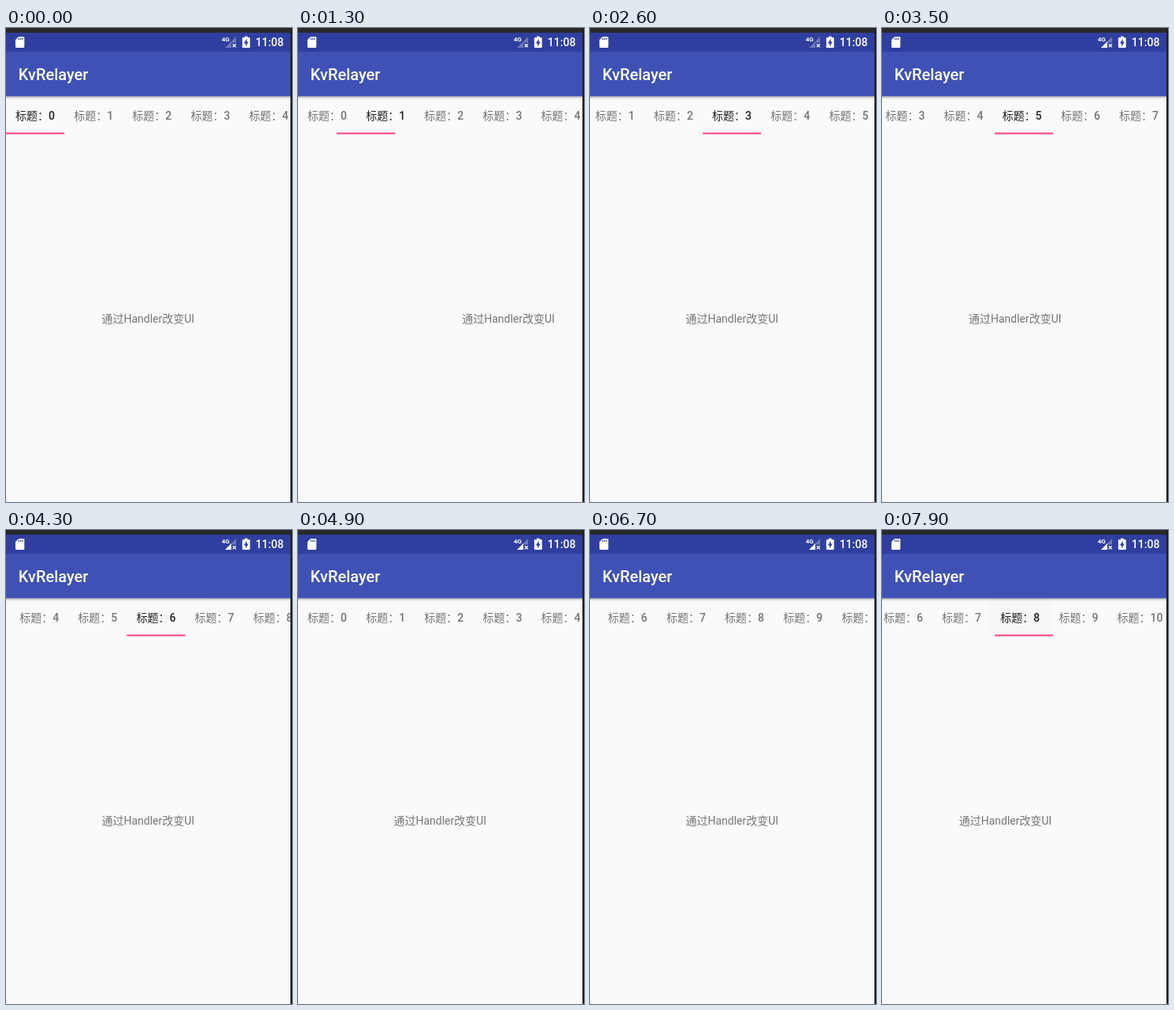
An HTML page for the animation above (8000 ms loop, 363 by 600 pixels).

```html
<!DOCTYPE html>
<html lang="zh">
<head>
<meta charset="utf-8">
<title>Tabs</title>
<style>
  html, body { margin: 0; width: 100%; height: 100%; overflow: hidden; background: #fafafa; }
  svg { display: block; width: 363px; height: 600px; }
  text { font: 14px Roboto, "Noto Sans CJK SC", "Noto Sans CJK", sans-serif; white-space: pre; }
  .medium { font-weight: 500; }
  .tab, .page { fill: #757575; }
  .tab.on { fill: #212121; }
  .page { text-anchor: middle; }
</style>
</head>
<body>
<svg viewBox="0 0 363 600">
  <defs>
    <linearGradient id="shade" x2="0" y2="1">
      <stop offset="0" stop-opacity=".36"/>
      <stop offset=".45" stop-opacity=".12"/>
      <stop offset="1" stop-opacity="0"/>
    </linearGradient>
  </defs>
  <rect width="363" height="600" fill="#fafafa"/>
  <g id="pages">
    <text class="page" x="180.3" y="372.8">通过Handler改变UI</text>
    <text class="page" x="541.3" y="372.8">通过Handler改变UI</text>
  </g>
  <g id="strip">
    <rect id="press" y="86.4" width="74.15" height="48"/>
  </g>
  <rect id="bar" y="132.4" height="2" fill="#ff4081"/>

  <rect y="86.4" width="361" height="4" fill="url(#shade)"/>
  <rect y="30" width="361" height="56.4" fill="#3f51b5"/>
  <rect y="6" width="361" height="24" fill="#303f9f"/>
  <rect width="363" height="6" fill="#29292b"/>
  <rect x="361" width="2" height="600" fill="#1d1d1f"/>
  <text class="medium" x="15.8" y="65.8" fill="#fff" style="font-size:20px">KvRelayer</text>

  <g fill="#fff">
    <path d="M16 11h6q1.300 0 1.300 1.300v11.400q0 1.300-1.300 1.300h-8.700q-1.300 0-1.300-1.300v-8.700z"/>
    <path d="M16.500 12.500v2.500M18.700 12.500v2.500M20.900 12.500v2.500" stroke="#303f9f" stroke-width="1.100"/>
    <text x="273.700" y="17.200" style="font-size:8px;font-weight:700">4G</text>
    <path d="M278 25L292 11V18.500H286V25z" fill-opacity=".3"/>
    <path id="signal" d="M278 25L286 17V25z"/>
    <path d="M287.800 20.300l4 4M291.800 20.300l-4 4" stroke="#fff" stroke-width="1.300"/>
    <path d="M303 10.500h3.600v1.500h2.300q.800 0 .800.800v11.400q0 .800-.800.800h-8.200q-.800 0-.800-.800v-11.400q0-.800.800-.800h2.300z"/>
    <path d="M305.600 13.500l-3.700 6h2.300v4l3.600-6h-2.200z" fill="#303f9f"/>
    <text class="medium" x="316.800" y="23">11:08</text>
  </g>
</svg>
<script>
const LOOP = 8000, PAGE = 361, TAB = 74.15, MID = 180.2, FRAME = 15.5;
const TAP_MS = 300, SETTLE_MS = 250, PRESS_MS = 600;
const PULL = 4230, FLING = 6350, FLING_END = 497;
const $ = id => document.getElementById(id);
const clamp = v => Math.min(1, Math.max(0, v));
const mix = (a, b, k) => a + (b - a) * k;
const easeOut = (u, n) => 1 - (1 - clamp(u)) ** n;
const smooth = u => (u = clamp(u)) * u * (3 - 2 * u);

// cubic-bezier(.4, 0, .2, 1)
function fastOut(u) {
  let lo = 0, hi = 1, s = .5;
  for (let i = 0; i < 18; i++) {
    s = (lo + hi) / 2;
    const x = 1.2 * s * (1 - s) ** 2 + .6 * s * s * (1 - s) + s ** 3;
    if (x < clamp(u)) lo = s; else hi = s;
  }
  return s * s * (3 - 2 * s);
}

const swipe = (at, from, drag = 150, part = .5) => ({ at, from, to: from + 1, drag, part });
const tap = (at, from, to) => ({ at, from, to, ms: Math.min(600, 100 * (Math.abs(to - from) + 1)) });
const tapBack = tap(5140, 6, 3), tapOn = tap(7410, 3, 8), lastSwipe = swipe(7869.5, 8);
const moves = [
  swipe(640, 0, 631.5, .55), swipe(1750, 1), swipe(2180, 2), swipe(2640, 3),
  swipe(3060, 4), swipe(3483, 5), tapBack, tapOn, lastSwipe
];

function pageAt(m, t, lag = 0) {
  const dt = t - m.at;
  if (m.ms) return mix(m.from, m.to, easeOut(dt / m.ms, 5));
  if (dt < m.drag) return m.from + m.part * clamp(dt / m.drag) ** 1.3;
  return m.from + mix(m.part, 1, easeOut((dt - m.drag - lag) / SETTLE_MS, 5));
}

const centred = p => Math.max(0, (p + .5) * TAB - MID);

function scrollAt(t, p) {
  if (t < PULL || t >= lastSwipe.at) return centred(p);
  if (t < tapBack.at) return mix(centred(6), 0, smooth((t - PULL) / 640));
  if (t < FLING) return mix(0, centred(3), fastOut((t - tapBack.at) / TAP_MS));
  if (t < tapOn.at) return mix(centred(3), FLING_END, easeOut((t - FLING) / 750, 3));
  return mix(FLING_END, centred(8), fastOut((t - tapOn.at) / TAP_MS));
}

// After a tap the bar grows in from just beside the chosen tab.
function barAt(m, t, p) {
  if (!m.ms) return [p * TAB, (p + 1) * TAB];
  const left = m.to * TAB, right = left + TAB;
  const start = m.to < m.from ? right + 24 : left - 24;
  const k = fastOut((t - m.at) / TAP_MS);
  return [mix(start, left, k), mix(start, right, k)];
}

const tabs = Array.from({ length: 13 }, (_, i) => {
  const el = document.createElementNS("http://www.w3.org/2000/svg", "text");
  const num = document.createElementNS(el.namespaceURI, "tspan");
  el.setAttribute("x", 12 + i * TAB + Math.max(0, i - 10) * 8);
  el.setAttribute("y", 115.5);
  num.setAttribute("class", "medium");
  num.textContent = i;
  el.append("标题：", num);
  $("strip").append(el);
  return el;
});

function draw(t) {
  const m = moves.filter(v => v.at <= t).pop() || moves[0];
  const page = pageAt(m, t), lagged = pageAt(m, t, FRAME);
  const chosen = m.ms || t >= m.at + m.drag ? m.to : m.from;
  const scroll = scrollAt(t, lagged);
  const [left, right] = barAt(m, t, lagged);
  const tapped = t < tapOn.at ? tapBack : tapOn;
  const fade = t < tapped.at ? 0 : 1 - clamp((t - tapped.at) / PRESS_MS);

  $("pages").setAttribute("transform", `translate(${-(page % 1) * PAGE})`);
  $("strip").setAttribute("transform", `translate(${-scroll})`);
  $("press").setAttribute("x", tapped.to * TAB);
  $("press").setAttribute("fill-opacity", .08 * fade);
  $("bar").setAttribute("x", left - scroll);
  $("bar").setAttribute("width", right - left);
  $("signal").setAttribute("fill-opacity", t < 3000 ? 0 : 1);
  tabs.forEach((el, i) => el.setAttribute("class", i === chosen ? "tab on" : "tab"));
}

const begin = performance.now();
function tick() {
  draw((performance.now() - begin) % LOOP);
  requestAnimationFrame(tick);
}
tick();
</script>
</body>
</html>
```
